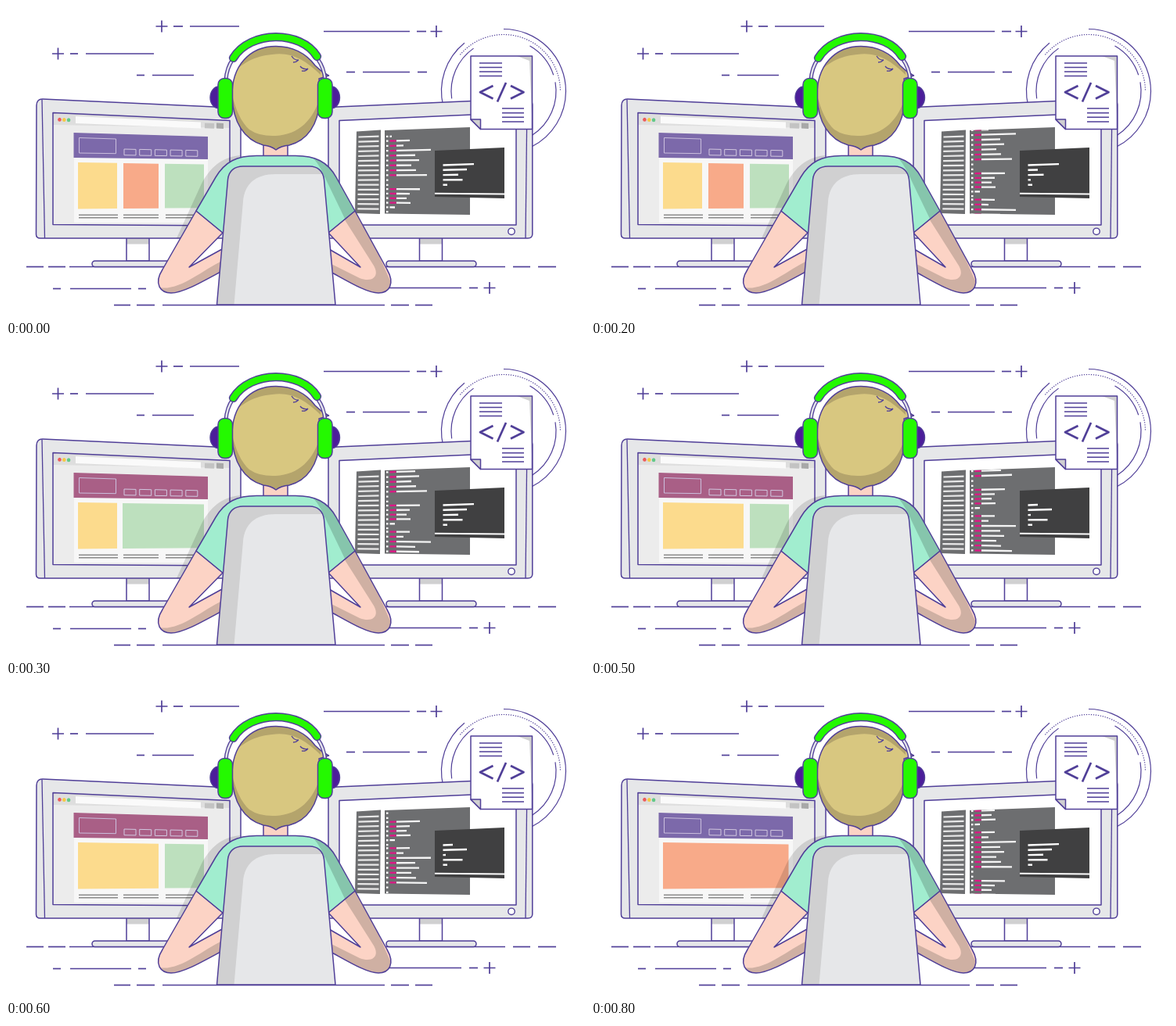
An HTML page with a canvas that plays this animation: 740 by 399 pixels, repeating every 0.9 s.

```html
<!DOCTYPE html>
<html lang="en">
<head>
<meta charset="utf-8">
<title>Coder at two screens</title>
<style>
html, body { margin: 0; width: 100%; height: 100%; overflow: hidden; background: #fff; }
canvas { display: block; width: 740px; height: 399px; }
</style>
</head>
<body>
<canvas id="stage"></canvas>
<script>
const canvas = document.getElementById('stage');
const ratio = window.devicePixelRatio || 1;
canvas.width = 740 * ratio;
canvas.height = 399 * ratio;
const ctx = canvas.getContext('2d');
ctx.scale(ratio, ratio);
ctx.lineJoin = 'round';

const INK = '#503f98', BODY = '#e6e7e9', SHADE = '#d0d0d1', PANEL = '#6d6e70';
const SKIN = '#fcd3c5', SKIN_DARK = '#cfb0a3', MINT = '#a1edcf';
const HAIR_LIGHT = '#d8c780', HAIR_DARK = '#b4a46c', LIME = '#24f900';
const YELLOW = '#fcdb8d', ORANGE = '#f8aa89', GREEN = '#bde0be';
const VIOLET = '#7c69aa', MAGENTA = '#a95f86';

function shape(d, fill, stroke, width = 1.5) {
  const p = new Path2D(d);
  if (fill) { ctx.fillStyle = fill; ctx.fill(p); }
  if (stroke) { ctx.strokeStyle = stroke; ctx.lineWidth = width; ctx.stroke(p); }
}

function clipped(d, draw) {
  ctx.save();
  ctx.clip(new Path2D(d));
  draw();
  ctx.restore();
}

function rect(x, y, w, h, fill) {
  ctx.fillStyle = fill;
  ctx.fillRect(x, y, w, h);
}

function rounded(x, y, w, h, r, fill) {
  ctx.beginPath();
  ctx.roundRect(x, y, w, h, r);
  ctx.fillStyle = fill;
  ctx.fill();
  ctx.strokeStyle = INK;
  ctx.lineWidth = 1.5;
  ctx.stroke();
}

function disc(x, y, rx, ry, fill, stroke) {
  ctx.beginPath();
  ctx.ellipse(x, y, rx, ry, 0, 0, 7);
  ctx.fillStyle = fill;
  ctx.fill();
  if (stroke) { ctx.strokeStyle = stroke; ctx.lineWidth = 1.4; ctx.stroke(); }
}

function arc(r, from, to, dash = []) {
  ctx.beginPath();
  ctx.arc(636, 109, r, from * Math.PI / 180, to * Math.PI / 180);
  ctx.setLineDash(dash);
  ctx.strokeStyle = INK;
  ctx.lineWidth = 1.2;
  ctx.stroke();
  ctx.setLineDash([]);
}

// Horizontal dashes: y, then pairs of x
function dashes(y, ...xs) {
  for (let i = 0; i < xs.length; i += 2) shape(`M${xs[i]},${y}H${xs[i + 1]}`, null, INK, 1.7);
}

function plus(x, y) {
  shape(`M${x - 7.5},${y}h15M${x},${y - 7.5}v15`, null, INK, 1.7);
}

function drawBackdrop() {
  plus(199, 26);
  dashes(26, 214, 226, 235, 298);
  plus(66.5, 61);
  dashes(61, 82, 92, 102, 189);
  dashes(88.5, 167, 177, 187, 240);
  dashes(32.5, 406, 516, 525, 537);
  plus(550, 32.5);
  dashes(84.5, 435, 446, 456, 516, 526, 538);
  dashes(333.5, 26, 48, 54, 76, 81, 210, 484, 638, 648, 670, 680, 703);
  dashes(361.5, 60, 70, 82, 160, 169, 179);
  dashes(360.5, 487, 582, 592, 603);
  plus(618, 360.5);
  dashes(382.5, 138, 159, 167, 190, 200, 484, 492, 515, 523, 545);

  arc(79.5, -90, 63);
  arc(79.5, 166, 231);
  arc(72.5, -140, 0, [1.3, 1.7]);
  arc(67, 172, 235);
  arc(67, -60, -18);
  arc(67, -10, 57);
}

function drawStand(neck, base, width) {
  rect(neck, 296, 29, 30, '#fff');
  rect(neck, 297, 29, 7.5, SHADE);
  shape(`M${neck},297V326H${neck + 29}V297`, null, INK);
  rounded(base, 326, width, 7.5, 3.7, BODY);
}

function drawBrowser(layout) {
  rect(60, 135, 228, 147, '#ececec');
  shape('M60,136 286,146V156L60,152Z', '#dedede');
  ['#ee5b5b', '#f5c945', '#62c988'].forEach((c, i) => disc(68.5 + i * 5.8, 145.3 + i * .2, 2.3, 2.5, c));
  shape('M89,141 249,148.5V156.5L89,150Z', '#fafafa');
  shape('M254,149.7 266,150V156.7L254,156.3Z', '#c3c3c3');
  shape('M269,149.5 278,150V157L269,156.6Z', '#a8a8a8');
  shape('M87,162 258,167V277H87Z', '#f7f7f7');

  shape('M86.5,162 258,167V196L86.5,194Z', layout.head);
  shape('M93.5,168.5 140.5,170V188.7L93.5,188Z', null, '#cbbfdd', 1);
  for (let i = 0; i < 5; i++) {
    shape(`M${151 + i * 19.7},${183 + i * .35}l15,.4v7.5l-15,-.2Z`, null, '#d2c8e0', 1);
  }
  const top = x => 200 + (x - 92) * .016;
  const foot = x => 259.5 - (x - 92) * .008;
  for (const [a, b, color] of layout.cards) {
    shape(`M${a},${top(a)} ${b},${top(b)}V${foot(b)}L${a},${foot(a)}Z`, color);
  }
  for (const y of [267.3, 270.7]) shape(`M93,${y}H143M150,${y}H195M204,${y}H240`, null, '#8b8b8b', 1.4);
}

const LEFT_SCREEN = 'M60,136.5 286,146.5V281L60,279.5Z';

function drawLeftMonitor(layout) {
  drawStand(154, 110, 113);
  shape('M39,127Q39.5,118.5 47,119L300,130.5V297H44Q38.5,297 38.5,292Z', BODY, INK);
  shape('M46,119.5 49.5,297', null, INK, 1.3);
  clipped(LEFT_SCREEN, () => drawBrowser(layout));
  shape(LEFT_SCREEN, null, INK);
}

// Right ends of the code rows; 0 leaves a gap
const ENDS = [516, 508, 543, 523, 528, 518, 524, 538, 0, 0, 529, 516, 512, 517, 497, 0];
const BLOCK = 94.8;
const rowTop = i => i < 10 ? 172.7 + i * 6.25 : 234.1 + (i - 10) * 5.8;

function codeRow(y, a, b, color) {
  const at = x => y + (y - 228) * .055 * (x - 484) / 109;
  shape(`M${a},${at(a)} ${b},${at(b)}`, null, color, 2.3);
}

function drawCode(step) {
  const shift = step * 10;
  codeRow(167 - shift, 486, 488.5, '#fff');
  codeRow(167 - shift, 490.5, 493, '#fff');
  for (let block = 0; block < 2; block++) {
    ENDS.forEach((end, i) => {
      const y = rowTop(i) + block * BLOCK - shift;
      codeRow(y, 486, 488.5, '#fff');
      if (!end) return;
      if (end < 500) return codeRow(y, 490.5, end, '#fff');
      codeRow(y, 490.5, 498.5, '#dd1685');
      codeRow(y, 499, end, '#f4f4f4');
    });
  }
}

function drawTerminal(ends) {
  shape('M548,185 637,181V246L548,244Z', '#404041');
  shape('M548,239.8 637,240.6', null, '#fff', 2);
  ends.forEach((end, i) => {
    const y = 203.5 + i * 6.3;
    shape(`M558.5,${y} ${end},${y - (end - 558) * .035 * (4 - i) / 4}`, null, '#fff', 2.4);
  });
}

const RIGHT_SCREEN = 'M426,146.5 652,136.5V280H426Z';
const CODE_PANEL = 'M484,159 593,155V267L484,265.5Z';

function drawRightMonitor(step, ends) {
  drawStand(528.5, 486, 115);
  shape('M412,129.5 665,118.5Q672.5,118 672.8,126V292Q672.5,297 667,297H412Z', BODY, INK);
  shape('M666,119 664,297', null, INK, 1.3);
  shape(RIGHT_SCREEN, '#fff', INK);
  disc(646, 288.3, 4.2, 4.2, '#fff', INK);

  shape('M448,160.5 479,158.5 478,266 446,265Z', PANEL);
  for (let i = 0; i < 16; i++) {
    const y = 167.5 + i * 6.12;
    shape(`M${450.5 - i * .08},${y} 476.5,${y - .8 + i * .07}`, null, '#e9e9e9', 2.2);
  }
  shape(CODE_PANEL, PANEL);
  clipped(CODE_PANEL, () => drawCode(step));
  drawTerminal(ends);
}

function drawDocument() {
  const page = 'M594,64H672.5V157.5H606.5L594,145Z';
  shape(page, '#fff');
  shape('M653,64H672.5V150L669,70Z', SHADE);
  shape(page, null, INK);
  shape('M594,145H606.5V157.5Z', SHADE, INK);
  shape('M605,73H634M605,78.5H634M605,84H634M605,89.5H634', null, INK, 1.4);
  shape('M634,131H662M634,136.7H662M634,142.3H662M634,148H662', null, INK, 1.4);
  shape('M622.5,102 606,110.3 622.5,118.5M639,98 628,122.5M645,102 661.5,110.3 645,118.5', null, INK, 2.7);
}

const LEFT_ARM = 'M243,262 200,337C188,356 198,367 211,367C226,367 252,352 276,339V311L234,334 277,290Z';
const RIGHT_ARM = 'M446,262 487,337C498,356 489,367 476,367C461,367 437,352 413,339V311L453,334 412,290Z';

function drawArm(arm, shade) {
  shape(arm, SKIN);
  clipped(arm, () => shape(shade, SKIN_DARK));
  shape(arm, null, INK);
}

const SHIRT = 'M243,262 268,219C280,199 295,191.5 320,191.5H370C395,191.5 411,199 422,219L446,262 412,290H277Z';

function drawBody() {
  ctx.globalAlpha = .13;
  shape('M300,191C275,193 261,207 250,227L218,297H232L268,220Z', '#000');
  ctx.globalAlpha = 1;
  drawArm(LEFT_ARM, 'M195,360C222,365 250,338 278,325V370H195Z');
  drawArm(RIGHT_ARM, 'M450,258 432,272 470,332C478,346 468,354 452,348L412,328V372H500Z');

  shape('M329,172V194H360V172Z', SKIN, INK);
  shape(SHIRT, MINT);
  ctx.globalAlpha = .17;
  clipped(SHIRT, () => shape('M384,188C396,195 402,207 408,220L434,274 452,262 420,200Z', '#000'));
  ctx.globalAlpha = 1;
  shape(SHIRT, null, INK);
}

const CHAIR = 'M269.5,382 283.5,222C284.5,211 292,205 303,205H388C398,205 405.5,211 406.5,222L421,382Z';

function drawChair() {
  shape(CHAIR, BODY);
  clipped(CHAIR, () => shape('M265,382V200H410V215H345C318,215 305,228 303,250L291.5,382Z', SHADE));
  shape(CHAIR, null, INK);
}

const HAIR = 'M289,116C288,76 312,51.5 345,51.5C365,51.5 383,60 395,76L404,84L412.5,89L400,93'
  + 'C402,101 402,111 401,121C399,152 385,172 362,178Q351,179 345,184Q339,179 329,178C304,171 290,148 289,116Z';

function drawHead() {
  disc(272, 117, 11, 14, '#4c1d9a', INK);
  disc(416, 117, 10.5, 14, '#4c1d9a', INK);
  shape(HAIR, HAIR_LIGHT);
  clipped(HAIR, () => {
    shape('M286,96C292,77 316,64 340,62C363,58 382,68 402,88V45H286Z', HAIR_DARK);
    shape('M286,96C290,125 298,146 311,158Q324,167 345,166C374,164 393,147 403,112V190H286Z', HAIR_DARK);
  });
  shape(HAIR, null, INK);
  shape('M365,64Q369,70 374,69M367,72Q371,72 374,69M376,77Q380,82 386,80M378,83Q383,84 386,80', null, INK, 1.3);

  for (const d of ['M290,68Q282,79 281,95', 'M398.5,68Q406.5,79 408,95']) {
    shape(d, null, INK, 5);
    shape(d, null, '#e3e3ea', 2.4);
  }
  ctx.lineCap = 'round';
  const band = 'M290.5,66.5C312,31 377,31 397.5,64.5';
  shape(band, null, INK, 11.2);
  shape(band, null, LIME, 8.2);
  ctx.lineCap = 'butt';
  rounded(271, 92.5, 18.5, 51, 8, LIME);
  rounded(398.5, 92.5, 18.5, 51, 8, LIME);
}

const LAYOUTS = [
  { head: VIOLET, cards: [[92, 142, YELLOW], [150, 195, ORANGE], [203, 253, GREEN]] },
  { head: MAGENTA, cards: [[92, 142, YELLOW], [149, 253, GREEN]] },
  { head: MAGENTA, cards: [[92, 195, YELLOW], [203, 253, GREEN]] },
  { head: VIOLET, cards: [[92, 252.5, ORANGE]] }
];
const OUTPUTS = [
  [598, 589, 578, 583.5, 564],
  [598, 571, 578.5, 562, 564],
  [571, 589, 562, 583.5, 564]
];
const LAYOUT_AT = [0, 0, 0, 1, 1, 2, 2, 3, 3];
const OUTPUT_AT = [0, 1, 1, 0, 0, 2, 2, 2, 0];

function draw(step) {
  rect(0, 0, 740, 399, '#fff');
  drawBackdrop();
  drawLeftMonitor(LAYOUTS[LAYOUT_AT[step]]);
  drawRightMonitor(step, OUTPUTS[OUTPUT_AT[step]]);
  drawDocument();
  drawBody();
  drawChair();
  drawHead();
}

const start = performance.now();
function tick() {
  draw(Math.floor((performance.now() - start) / 100) % 9);
  requestAnimationFrame(tick);
}
tick();
</script>
</body>
</html>
```
